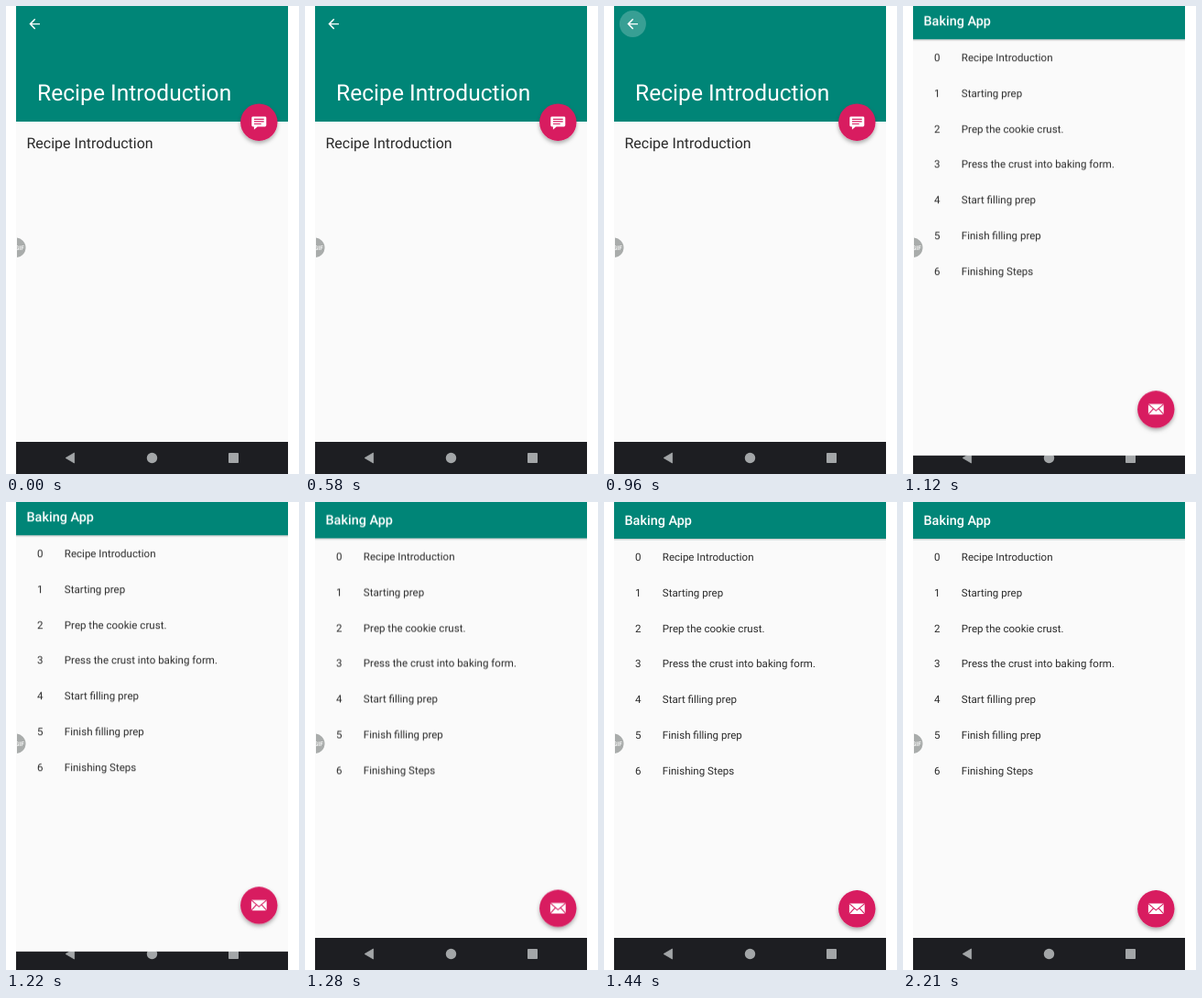
Recreate the animation shown at these times as an HTML page. Size 320 by 510 pixels, loop 2720 ms.

```html
<!DOCTYPE html>
<html lang="en">
<head>
<meta charset="utf-8">
<title>Recipe steps</title>
<style>
  html, body { margin: 0; width: 100%; height: 100%; overflow: hidden; background: #fff; }
  svg { display: block; width: 320px; height: 510px; }
  text { font-family: Roboto, sans-serif; text-rendering: geometricPrecision; white-space: pre; }
  .teal { fill: #008577; }
  .paper { fill: #fafafa; }
  .ink { fill: #000; fill-opacity: .83; }
  .row { font-size: 11.56px; }
  .light { fill: #fff; }
  .fab { fill: #d81b60; }
  .cut { fill: none; stroke: #d81b60; }
</style>
</head>
<body>
<svg viewBox="0 0 320 510">
  <defs>
    <clipPath id="screen"><rect x="11" y="0" width="297" height="510"/></clipPath>
    <clipPath id="edge"><rect x="12" y="240" width="30" height="50"/></clipPath>
    <filter id="lift" x="-40%" y="-40%" width="180%" height="180%">
      <feDropShadow dx="0" dy="2.4" stdDeviation="2" flood-color="#000" flood-opacity=".32"/>
    </filter>
    <linearGradient id="fade" x1="0" y1="0" x2="0" y2="1">
      <stop offset="0" stop-color="#000" stop-opacity=".2"/>
      <stop offset="1" stop-color="#000" stop-opacity="0"/>
    </linearGradient>
  </defs>

  <g clip-path="url(#screen)">
    <rect class="paper" x="11" y="0" width="297" height="510"/>

    <g id="nav">
      <rect x="11" y="475" width="297" height="35" fill="#1d1e22"/>
      <g fill="#a3a6a8">
        <path d="M65.2 492.5L74.6 487V498Z" stroke="#a3a6a8" stroke-width=".8" stroke-linejoin="round"/>
        <circle cx="159.5" cy="492.5" r="5.7"/>
        <rect x="243" y="487" width="11" height="11" rx=".8"/>
      </g>
    </g>

    <g id="detail">
      <rect class="teal" x="11" y="0" width="297" height="126"/>
      <circle id="ripple" class="light" cx="31.4" cy="19.5" r="14.5" fill-opacity=".22"/>
      <path class="light" transform="translate(22.53 10.93) scale(.7227)"
        d="M20 11H7.83l5.59-5.59L12 4l-8 8 8 8 1.41-1.41L7.83 13H20v-2z"/>
      <text class="light" x="34.1" y="103.2" font-size="24.57">Recipe Introduction</text>
      <text class="ink" x="22.5" y="154.8" font-size="16">Recipe Introduction</text>
      <g transform="translate(276.3 126.7)">
        <circle class="fab" r="20.2" filter="url(#lift)"/>
        <path class="light" d="M-6.6 -6.3H6.6Q8 -6.3 8 -4.9V3.4Q8 4.8 6.6 4.8H-1.6L-5.4 8V4.8H-6.6Q-8 4.8 -8 3.4V-4.9Q-8 -6.3 -6.6 -6.3Z"/>
        <path class="cut" stroke-width="1.2" d="M-5.4 -3.4H5.4M-5.4 -.8H5.4M-5.4 1.8H2.4"/>
      </g>
    </g>

    <g id="list">
      <rect id="overlap" class="paper" x="11" y="470" width="297" height="23.8"/>
      <rect class="paper" x="11" y="0" width="297" height="475"/>
      <rect class="teal" x="11" y="-10" width="297" height="50"/>
      <rect x="11" y="40" width="297" height="2.5" fill="url(#fade)"/>
      <text class="light" x="22.5" y="25.1" font-size="14.45" font-weight="500">Baking App</text>
      <g id="rows"></g>
      <g transform="translate(276.3 443.3)">
        <circle class="fab" r="20.2" filter="url(#lift)"/>
        <rect class="light" x="-8.4" y="-5.8" width="16.8" height="11.6" rx=".5"/>
        <path class="cut" stroke-width="1.1" d="M-8.4 -5.6L0 1.6L8.4 -5.6M-8.4 5.6L-2.8 -.6M8.4 5.6L2.8 -.6"/>
      </g>
    </g>

    <g clip-path="url(#edge)">
      <circle cx="10.7" cy="263.3" r="10.8" fill="#a9acab"/>
      <text class="light" x="9.7" y="265.8" font-size="6.7" font-weight="500">GIF</text>
    </g>
  </g>
</svg>
<script>
const LOOP = 2720;
const $ = id => document.getElementById(id);

const steps = [
  'Recipe Introduction', 'Starting prep', 'Prep the cookie crust.',
  'Press the crust into baking form.', 'Start filling prep',
  'Finish filling prep', 'Finishing Steps'
];

function label(x, y, str) {
  const t = document.createElementNS('http://www.w3.org/2000/svg', 'text');
  t.setAttribute('class', 'ink row');
  t.setAttribute('x', x);
  t.setAttribute('y', y);
  t.textContent = str;
  $('rows').append(t);
}

steps.forEach((name, i) => {
  const y = 64 + i * 38.77;
  label(34.1, y, i);
  label(63.8, y, name);
});

// Each entry is [start in ms, value], held until the next one.
function hold(id, prop, table) {
  const frames = table.map(([t, v]) => ({ offset: t / LOOP, [prop]: v, easing: 'steps(1, end)' }));
  frames.push({ offset: 1, [prop]: table[table.length - 1][1] });
  const anim = $(id).animate(frames, { duration: LOOP, iterations: Infinity });
  anim.startTime = document.timeline.currentTime;
}

const lift = y => `translateY(${y}px)`;

hold('ripple', 'visibility', [[0, 'hidden'], [960, 'visible'], [1120, 'hidden']]);
hold('detail', 'opacity', [[0, 1], [1120, 0]]);
hold('list', 'opacity', [[0, 0], [1120, 1]]);
hold('list', 'transform', [[0, lift(-3.8)], [1280, lift(-.5)], [1440, lift(0)]]);
hold('overlap', 'opacity', [[0, 0], [1120, 1], [1280, 0]]);
</script>
</body>
</html>
```
